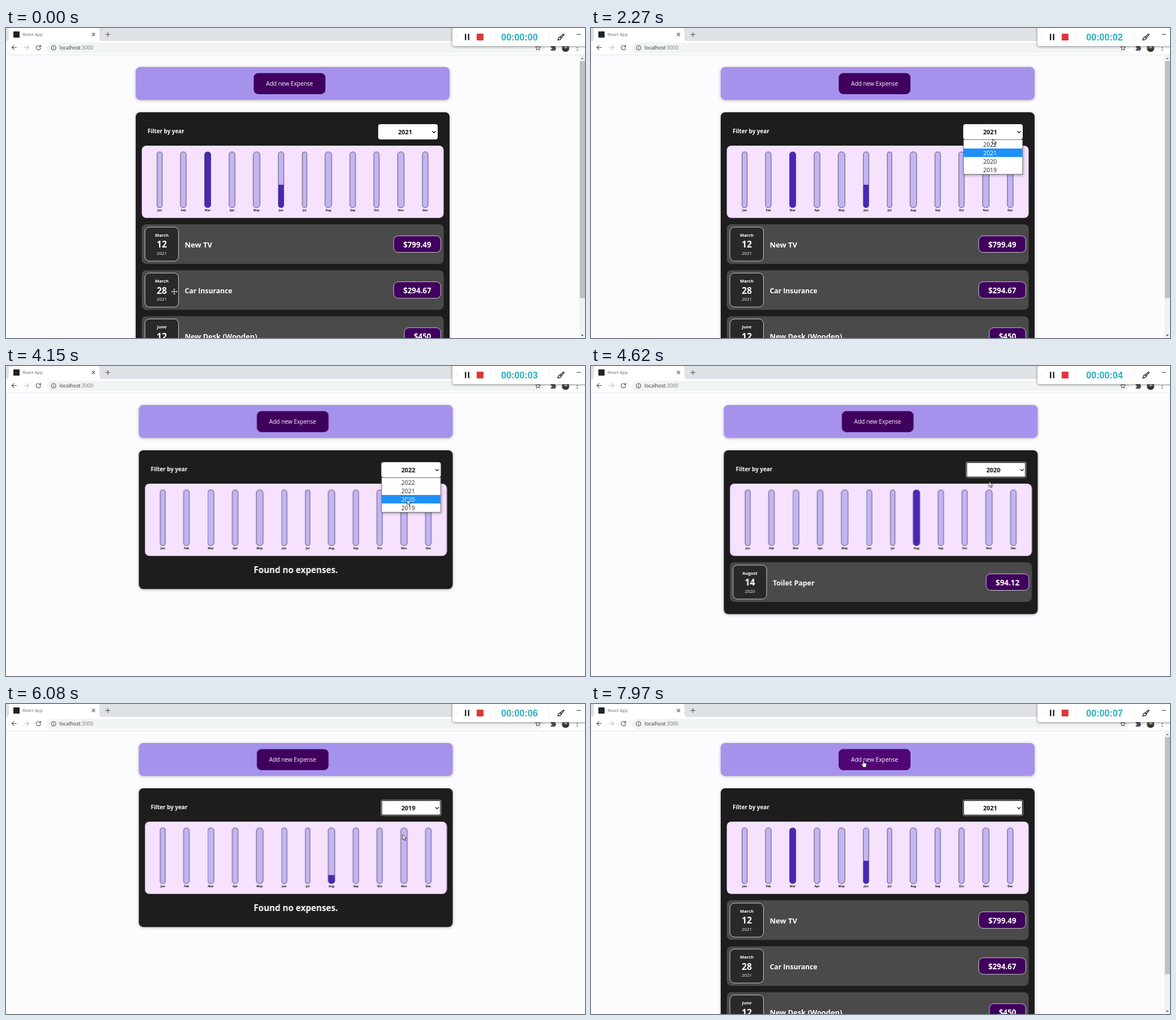
Animation, 1022 px wide and 548 px high, one loop 8000 ms. Source, as an HTML page:

```html
<!DOCTYPE html>
<html lang="en">
<head>
<meta charset="utf-8">
<title>Expenses</title>
<style>
  html, body { margin: 0; width: 100%; height: 100%; overflow: hidden; background: #fcfcfe; }
  svg { display: block; width: 100%; height: 100%; }
  text { font-family: "Open Sans", "Noto Sans", sans-serif; }
  .b { font-weight: 700; }
  .mid { text-anchor: middle; }
  .clock text { font: 700 16.2px "Liberation Sans", sans-serif; }
  .line { fill: none; stroke: #4b4e52; stroke-width: 1.1; stroke-linecap: round; stroke-linejoin: round; }
  .card { filter: drop-shadow(0 1px 2.5px rgba(0, 0, 0, .3)); }
  .fill { transform-box: fill-box; transform-origin: 50% 100%; }
</style>
</head>
<body>
<svg id="stage" viewBox="0 0 1022 548"></svg>
<script>
const LOOP = 8000;
const rules = [];

const rect = (x, y, w, h, r, fill, more = '') =>
  `<rect x="${x}" y="${y}" width="${w}" height="${h}" rx="${r}" fill="${fill}" ${more}/>`;
const text = (x, y, str, size, fill, cls = '') =>
  `<text x="${x}" y="${y}" font-size="${size}" fill="${fill}" class="${cls}">${str}</text>`;
const line = (d, more = '') => `<path class="line" d="${d}" ${more}/>`;
const group = (cls, ...parts) => `<g class="${cls}">${parts.join('')}</g>`;

// frames: [ms, css] pairs; the last one holds to the end of the loop
function animate(cls, easing, frames) {
  const all = [...frames, [LOOP, frames[frames.length - 1][1]]];
  const body = all.map(([ms, css]) => `${ms / LOOP * 100}% { ${css} }`).join(' ');
  rules.push(`@keyframes ${cls} { ${body} }`,
    `.${cls} { animation: ${cls} ${LOOP}ms ${easing} infinite; }`);
}

// visible only inside the given [from, to] spans
function show(cls, ...spans) {
  const frames = spans[0][0] > 0 ? [[0, 'opacity: 0']] : [];
  for (const [from, to] of spans) {
    frames.push([from, 'opacity: 1']);
    if (to < LOOP) frames.push([to, 'opacity: 0']);
  }
  animate(cls, 'step-end', frames);
}

// ---- timeline ----
const pick = { 2022: 2500, 2020: 4240, 2019: 5880, 2021: 7300 };
const opened = [1950, 3400, 5200, 6750];
const years = [2022, 2021, 2020, 2019];

show('sel2021', [0, pick[2022]], [pick[2021], LOOP]);
show('sel2022', [pick[2022], pick[2020]]);
show('sel2020', [pick[2020], pick[2019]]);
show('sel2019', [pick[2019], pick[2021]]);
show('list2021', [0, pick[2022]], [pick[2021], LOOP]);
show('list2020', [pick[2020], pick[2019]]);
show('empty', [pick[2022], pick[2020]], [pick[2019], pick[2021]]);
show('scroll', [0, pick[2022]], [pick[2021], LOOP]);
show('menu', [opened[0], pick[2022]], [opened[1], pick[2020]], [opened[2], pick[2019]], [opened[3], pick[2021]]);
show('ring', [pick[2022], opened[1]], [pick[2020], opened[2]], [pick[2019], opened[3]], [pick[2021], LOOP]);
show('hot2022', [2320, 2500], [3400, 3880], [5495, 5550], [6925, 7000]);
show('hot2021', [1950, 2320], [3880, 3980], [5550, 5600], [7000, 7300]);
show('hot2020', [3980, 4240], [5200, 5495], [5600, 5670]);
show('hot2019', [5670, 5880], [6750, 6925]);
show('hover', [7780, LOOP]);

animate('page', 'step-end', [
  [0, 'transform: none'], [pick[2022], 'transform: translateX(5.5px)'], [pick[2021], 'transform: none']]);

const scale = k => `transform: scaleY(${k}); animation-timing-function: ease-out`;
animate('grow2021', 'linear', [
  [0, scale(1)], [pick[2022], scale(1)], [pick[2022] + 300, scale(0)],
  [pick[2021], scale(0)], [pick[2021] + 300, scale(1)]]);
animate('grow2020', 'linear', [
  [0, scale(0)], [pick[2020], scale(0)], [pick[2020] + 300, scale(1)],
  [pick[2019], scale(1)], [pick[2019] + 300, scale(0)]]);

const ticks = [0, 1080, 2080, 3540, 4390, 5100, 6080, 7080, LOOP];
for (let i = 0; i < 8; i++) show('tick' + i, [ticks[i], ticks[i + 1]]);

const path = [
  [0, 297, 466], [850, 297, 466], [1720, 709, 186], [2150, 709, 188], [2270, 709, 196],
  [2400, 708, 205], [2520, 708, 206], [2900, 707, 183], [3600, 707, 183], [4120, 708, 236],
  [4260, 708, 236], [4900, 699, 184], [5380, 699, 184], [5740, 700, 248], [5900, 700, 248],
  [6400, 700, 185], [6800, 700, 185], [7100, 699, 221], [7400, 699, 221], [7900, 481, 100]];
animate('cursor', 'ease-in-out', path.map(([ms, x, y]) => [ms, `transform: translate(${x}px, ${y}px)`]));
show('move', [0, 880]);
show('arrow', [880, 7780]);
show('hand', [7780, LOOP]);

// ---- page ----
function bars() {
  const names = 'Jan Feb Mar Apr May Jun Jul Aug Sep Oct Nov Dec'.split(' ');
  const mids = [271.2, 313, 356, 399, 442.3, 485.5, 527, 569, 612, 654, 697, 740];
  const widths = [9, 10, 11, 10.2, 11.8, 9.6, 8, 11.6, 9.8, 9.6, 11.4, 10];
  const level = { Mar: [1, 'grow2021'], Jun: [.41, 'grow2021'], Aug: [1, 'grow2020'] };
  return names.map((name, i) => {
    const w = widths[i], x = mids[i] - w / 2, r = w / 2.2;
    const [part, cls] = level[name] || [];
    const h = 98.5 * part;
    const fill = part ? `<clipPath id="${name}">${rect(x, 219, w, 98.5, r, '#000')}</clipPath>
      <g clip-path="url(#${name})">${rect(x, 317.5 - h, w, h, 0, '#4826b9', `class="fill ${cls}"`)}</g>` : '';
    return rect(x, 219, w, 98.5, r, '#c3b4f3') + fill +
      rect(x, 219, w, 98.5, r, 'none', 'stroke="#3a3446" stroke-width=".8"') +
      text(mids[i], 323.6, name, 5.2, '#111', 'b mid');
  }).join('');
}

function item(y, month, day, year, title, size, price, left) {
  const edge = 'stroke="#eee" stroke-width=".8"';
  return rect(239.7, y, 532.8, 70, 8, '#4a4a4a') +
    rect(245.2, y + 5, 59.3, 60, 8, '#292929', edge) +
    text(275, y + 22, month, 7.6, '#fff', 'b mid') +
    text(275, y + 41.3, day, 15.7, '#fff', 'b mid') +
    text(275, y + 53.8, year, 7.8, '#fff', 'mid') +
    text(315.5, y + 40.6, title, size, '#fff', 'b') +
    rect(left, y + 20.4, 767.4 - left, 29.2, 8, '#40005d', edge) +
    text((left + 767.4) / 2, y + 40.8, price, 13.3, '#fff', 'b mid');
}

const panel = h => rect(229, 149, 554, h, 8, '#1d1d1d', 'class="card"');

const select = group('',
  rect(657, 170, 105, 27, 4, '#fff'),
  group('ring',
    rect(656.5, 169.5, 106, 28, 2.5, '#fff'),
    rect(657.6, 170.6, 103.8, 25.8, 2, '#fff', 'stroke="#101010" stroke-width="1.2"')),
  ...years.map(y => group('sel' + y, text(704.5, 188.2, y, 10.8, '#111', 'b mid'))),
  line('M752.8 182.8l2.6 2.6 2.6-2.6', 'style="stroke:#111;stroke-width:1.3"'));

const menu = group('menu',
  rect(657.5, 197.5, 104.3, 61, 0, '#fff', 'stroke="#777" stroke-width="1" style="filter:drop-shadow(1px 2px 2px rgba(0,0,0,.3))"'),
  ...years.map((y, i) => {
    const top = 198 + 15 * i;
    return text(704.2, top + 11.6, y, 10.4, '#222', 'mid') +
      group('hot' + y, rect(658, top, 103.3, 15, 0, '#1e90f8'), text(704.2, top + 11.6, y, 10.4, '#fff', 'mid'));
  }));

const page = group('page',
  rect(229, 69, 554, 58, 8, '#a692ec', 'class="card"'),
  rect(437.3, 79.7, 126.5, 37.2, 8, '#40005d'),
  group('hover', rect(437.3, 79.7, 126.5, 37.2, 8, '#510674')),
  text(500.5, 102.4, 'Add new Expense', 10.1, '#fff', 'mid'),
  group('list2021', panel(440)),
  group('list2020', panel(289.5)),
  group('empty', panel(245.3), text(506, 366.2, 'Found no expenses.', 15.15, '#fff', 'b mid')),
  text(250, 185.6, 'Filter by year', 9.9, '#fff', 'b'),
  rect(239.7, 208, 532.8, 127.8, 8, '#f6e1fe'),
  bars(),
  group('list2021',
    item(347, 'March', 12, 2021, 'New TV', 13, '$799.49', 684.3),
    item(428.2, 'March', 28, 2021, 'Car Insurance', 12.2, '$294.67', 684.3),
    item(509.4, 'June', 12, 2021, 'New Desk (Wooden)', 12.85, '$450', 703)),
  group('list2020', item(347, 'August', 14, 2020, 'Toilet Paper', 12.4, '$94.12', 692)),
  select, menu);

const scrollbar = group('scroll',
  rect(1012, 48, 10, 500, 0, '#f1f1f1'),
  rect(1013, 58.5, 9, 419, 0, '#c1c1c1'),
  '<path d="M1014.8 55l2.5-2.8 2.5 2.8z" fill="#777"/><path d="M1014.8 542l2.5 2.8 2.5-2.8z" fill="#555"/>');

// ---- browser window ----
const browser = group('',
  rect(0, 0, 1022, 24, 0, '#dee1e6'),
  rect(0, 23, 1022, 25, 0, '#fff'),
  '<path d="M0 23.5Q5 23 5 17V4Q5 0 9 0H161Q165 0 165 4V17Q165 23 171 23.5z" fill="#fff"/>',
  rect(0, 47, 1022, 1, 0, '#e3e4e6'),
  rect(13, 6, 11, 11, 1, '#20232a'),
  text(29, 14.2, 'React App', 7.7, '#65686c'),
  line('M152 9l4.8 4.8m0-4.8l-4.8 4.8'),
  line('M176 11.5h7.6m-3.8-3.8v7.6'),
  line('M18.5 34.5h-8m3.6-3.7l-3.7 3.7 3.7 3.7'),
  line('M32 34.5h8m-3.6-3.7l3.7 3.7-3.7 3.7', 'style="stroke:#bbbec2"'),
  line('M60.3 32.2a4 4 0 1 0 .8 3.2M61.2 30.4v2.9h-2.9'),
  rect(72, 26, 878, 18, 9, '#f1f3f4'),
  '<circle class="line" cx="84" cy="35" r="4"/>', line('M84 34.6v2.2M84 32.8v.1'),
  '<text x="94.5" y="38.2" font-size="8.83" fill="#2b2d30">localhost<tspan fill="#74777b">:3000</tspan></text>',
  line('M939 30.6l1.3 2.9 3.1.3-2.4 2.1.7 3.1-2.7-1.6-2.7 1.6.7-3.1-2.4-2.1 3.1-.3z', 'style="stroke-width:1"'),
  '<path d="M961.5 32h2.6a1.6 1.6 0 1 1 3.2 0h2.4v2.6a1.5 1.5 0 1 1 0 3v2.4h-8.2v-2.6a1.5 1.5 0 1 0 0-2.8z" fill="#4f5256"/>',
  '<circle cx="987.7" cy="35.3" r="6.6" fill="#52604f"/><path d="M981.3 37a6.6 6.6 0 0 0 12.8 0q-6-3-12.8 0z" fill="#2d3830"/><circle cx="988" cy="34" r="2.2" fill="#a9b0a4"/>',
  [31, 35, 39].map(y => `<circle cx="1008.3" cy="${y}" r="1" fill="#4b4e52"/>`).join(''));

const recorder = group('',
  rect(788, -8, 244, 40, 4, '#fff', 'style="filter:drop-shadow(0 1px 2px rgba(0,0,0,.45))"'),
  rect(810, 10.3, 2.3, 11.2, .5, '#161616'),
  rect(815.4, 10.3, 2.3, 11.2, .5, '#161616'),
  rect(830.8, 10, 12, 12, 1.2, '#d9393c'),
  rect(855, 5, 1, 21, 0, '#ececec'),
  rect(958, 5, 1, 21, 0, '#ececec'),
  line('M796 12.5q-2 3 0 6', 'style="stroke:#ddd;stroke-width:.8"'),
  group('clock', ...Array.from({ length: 8 }, (_, i) =>
    group('tick' + i, text(906.3, 21.8, '00:00:0' + i, 16.2, '#2bb0c1', 'mid')))),
  line('M978.3 15.6l5.2-4.7q1.4-.7 1.6.9l-4.6 5.5zM978 15.8q-2.9.2-3 2.8 0 1.8-1.4 2.4 5.3.8 6.7-3.2z', 'style="stroke:#1c1c1c;stroke-width:1.3"'),
  line('M1007.5 11.3h7', 'style="stroke:#333;stroke-width:1"'));

const cursor = group('cursor',
  group('move',
    '<path d="M0-5.8l2.3 2.5H.8V-.8h2.5v-1.5L5.8 0 3.3 2.3V.8H.8v2.5h1.5L0 5.8l-2.3-2.5h1.5V.8h-2.5v1.5L-5.8 0l2.5-2.3v1.5h2.5v-2.5h-1.5z" fill="#fff" stroke="#111" stroke-width=".6"/>'),
  group('arrow',
    '<path d="M0 0v9.3l2.2-2 1.5 3.5 1.6-.7-1.5-3.4h2.9z" fill="#fff" stroke="#111" stroke-width=".8"/>'),
  group('hand',
    '<path d="M-1 .8Q0-.8 1 .8V4.4l3 .6q1.4.4 1.3 1.9l-.7 3.2v1.6H-1.2V10.2L-3.6 7q-.6-1.4.8-1.3L-1 7z" fill="#fff" stroke="#222" stroke-width=".7"/>'));

document.getElementById('stage').innerHTML =
  rect(0, 0, 1022, 548, 0, '#fcfcfe') + page + scrollbar + browser + recorder + cursor;
const style = document.createElement('style');
style.textContent = rules.join('\n');
document.head.append(style);
</script>
</body>
</html>
```
